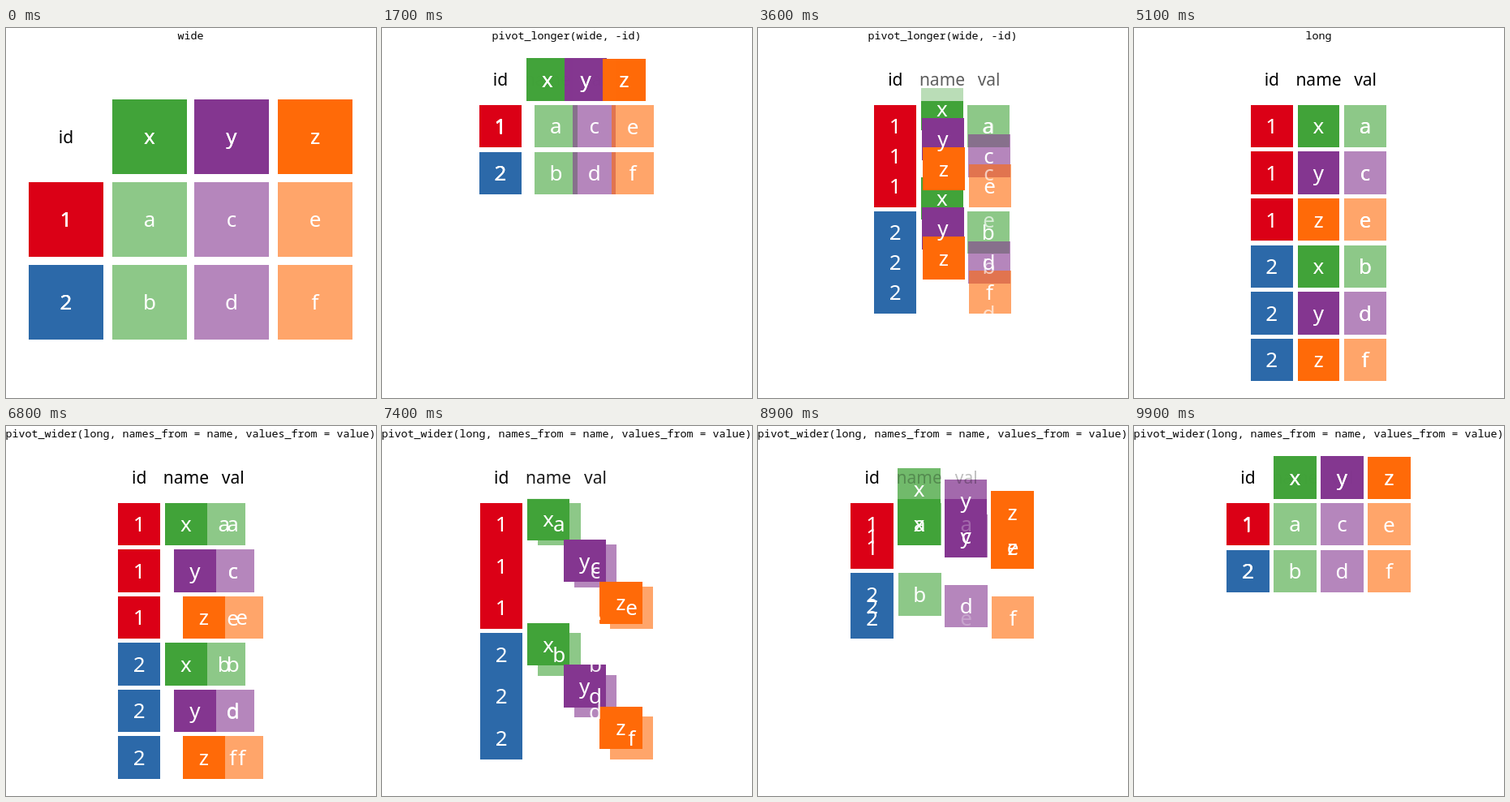
Animation of 456x456 px, one loop 10 s. Source, as an HTML page:

```html
<!DOCTYPE html>
<html lang="en">
<head>
<meta charset="utf-8">
<title>Wide and long tables</title>
<style>
  html, body { margin: 0; width: 100%; height: 100%; overflow: hidden; background: #fff; }
  svg { display: block; width: 100%; height: 100%; }
  text { text-anchor: middle; font-family: "Fira Sans", "Noto Sans", "Open Sans", sans-serif; }
  .cell { font-size: 26px; fill: #fff; }
  .head { font-size: 21px; fill: #000; }
  #title { font: 13.333px "Fira Mono", "Noto Sans Mono", "DejaVu Sans Mono", monospace; white-space: pre; }
</style>
</head>
<body>
<svg id="stage" viewBox="0 0 456 456">
  <g id="tiles" shape-rendering="crispEdges"></g>
  <g id="labels"></g>
  <text id="title" x="227.5" y="14"></text>
</svg>
<script>
const LOOP = 10000, STEP = 100;
const GREEN = '#41a339', PURPLE = '#843690', ORANGE = '#ff6a08';
const RED = '#db0016', BLUE = '#2c69a9';

// Column edges of both layouts, and the shared row grid
const wideX = [114.2, 172.1, 230.1, 288.1], wideW = 52.6;
const longX = [143.9, 201.6, 259.2], longW = 51.8;
const rowY = r => 37.15 + 57.63 * r, rowH = 52.4;
// Enlarged layout of the resting wide table
const bigX = [28, 131, 232, 335], bigY = r => 88 + 102 * r, bigSize = 92;

const mix = (a, b, p) => a + (b - a) * p;
const sineInOut = t => (1 - Math.cos(Math.PI * t)) / 2;
const expoOut = t => t >= 1 ? 1 : 1 - 2 ** (-10 * t);

const items = [];
const byId = id => document.getElementById(id);

function make(tag, parent, attrs) {
  const el = document.createElementNS('http://www.w3.org/2000/svg', tag);
  for (const key in attrs) el.setAttribute(key, attrs[key]);
  return byId(parent).appendChild(el);
}

// wide and long are [column, row]; fading items exist only in the long table
function add(label, wide, long, { color, alpha = 1, head = false, fades = false }) {
  const tile = color && make('rect', 'tiles', { fill: color });
  const text = make('text', 'labels', { class: head ? 'head' : 'cell' });
  text.textContent = label;
  items.push({ tile, text, wide, long, alpha, fades, drop: head ? 7.5 : 9.3 });
}

const keys = [['x', GREEN, 'ab'], ['y', PURPLE, 'cd'], ['z', ORANGE, 'ef']];
function eachCell(fn) {
  keys.forEach(([name, color, values], k) => {
    for (const g of [0, 1]) fn({ name, color, value: values[g], k, g, row: 1 + 3 * g + k });
  });
}

eachCell(c => add(c.value, [c.k + 1, c.g + 1], [2, c.row], { color: c.color, alpha: 0.6 }));
eachCell(c => add(c.g + 1, [0, c.g + 1], [0, c.row], { color: c.g ? BLUE : RED }));
eachCell(c => add(c.name, [c.k + 1, 0], [1, c.row], { color: c.color }));
eachCell(c => add(c.value, [2, c.row], [2, c.row], { fades: true }));
add('id', [0, 0], [0, 0], { head: true });
add('name', [1, 0], [1, 0], { color: '#fff', head: true, fades: true });
add('val', [2, 0], [2, 0], { color: '#fff', head: true, fades: true });

function stateAt(ms) {
  const n = Math.floor(ms / STEP);
  if (n < 17) return { title: 'wide', big: true, px: 0, py: 0 };
  if (n < 51) {
    const t = (n - 16) / 34;
    return { title: 'pivot_longer(wide, -id)', px: expoOut(t), py: sineInOut(t) };
  }
  if (n < 68) return { title: 'long', px: 1, py: 1 };
  const t = (n - 67) / 33;
  return {
    title: 'pivot_wider(long, names_from = name, values_from = value)',
    px: 1 - expoOut(t), py: 1 - sineInOut(t)
  };
}

function boxOf({ wide, long }, { big, px, py }) {
  if (big) return { x: bigX[wide[0]], y: bigY(wide[1]), w: bigSize, h: bigSize };
  return {
    x: mix(wideX[wide[0]], longX[long[0]], px),
    y: rowY(mix(wide[1], long[1], py)),
    w: mix(wideW, longW, px),
    h: rowH
  };
}

function render(ms) {
  const state = stateAt(ms);
  byId('title').textContent = state.title;
  for (const item of items) {
    const { x, y, w, h } = boxOf(item, state);
    const shown = item.fades ? state.py : 1;
    if (item.tile) {
      const left = Math.round(x), top = Math.round(y);
      item.tile.setAttribute('x', left);
      item.tile.setAttribute('y', top);
      item.tile.setAttribute('width', Math.round(x + w) - left);
      item.tile.setAttribute('height', Math.round(y + h) - top);
      item.tile.setAttribute('opacity', item.alpha * shown);
    }
    item.text.setAttribute('x', x + w / 2);
    item.text.setAttribute('y', y + h / 2 + item.drop);
    item.text.setAttribute('opacity', shown);
  }
}

const start = performance.now();
function tick() {
  render((performance.now() - start) % LOOP);
  requestAnimationFrame(tick);
}
tick();
</script>
</body>
</html>
```
